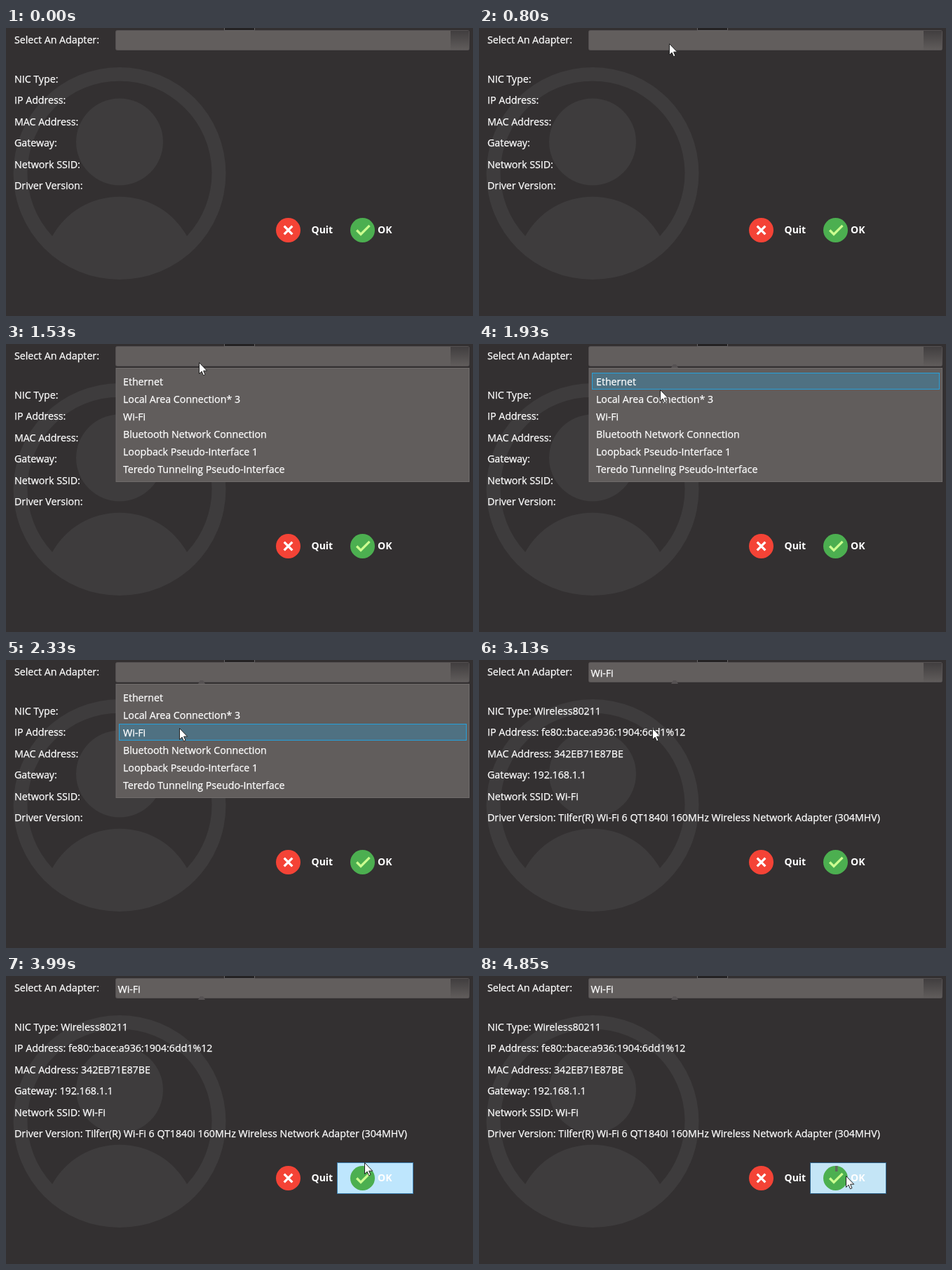
An HTML page that plays this animation: 666x411 px, repeating every 4990 ms.

```html
<!DOCTYPE html>
<html lang="en">
<head>
<meta charset="utf-8">
<title>Select An Adapter</title>
<style>
html, body { margin: 0; width: 100%; height: 100%; overflow: hidden; background: #333031; }
svg { display: block; width: 666px; height: 411px; }
text { font: 14.2px "Open Sans", "Noto Sans", sans-serif; fill: #fff; stroke: #fff; stroke-width: .25px; }
.bold { font-weight: 700; font-size: 14px; stroke: none; }
.soft { fill: #3e3c3d; }

.cursor, .slide, .popup, .row, .value, .hover, .press, .trace, .smudge {
  animation: 4.99s step-end infinite;
}
.cursor { animation-name: cursor; }
.popup { animation-name: popup; }
.slide { animation-name: slide; }
.row { animation-name: row; }
.value { animation-name: value; }
.hover { animation-name: hover; }
.press { animation-name: press; }
.trace { animation-name: trace; }
.smudge { animation-name: smudge; }

@keyframes cursor {
  0% { transform: translate(-40px, -40px); }
  4% { transform: translate(146px, 283px); }
  5.41% { transform: translate(186px, 222px); }
  6.61% { transform: translate(246px, 146px); }
  8.01% { transform: translate(318px, 76px); }
  9.41% { transform: translate(384px, 26px); }
  10.62% { transform: translate(428px, 1px); }
  12.02% { transform: translate(342px, 2px); }
  13.42% { transform: translate(257px, 9px); }
  14.62% { transform: translate(264px, 15px); }
  16.03% { transform: translate(271px, 22px); }
  17.23% { transform: translate(275px, 26px); }
  37.27% { transform: translate(264px, 49px); }
  38.67% { transform: translate(258px, 65px); }
  43.88% { transform: translate(256px, 71px); }
  45.29% { transform: translate(251px, 85px); }
  46.69% { transform: translate(247px, 97px); }
  66.73% { transform: translate(257px, 103px); }
  68.13% { transform: translate(282px, 119px); }
  69.33% { transform: translate(321px, 143px); }
  70.74% { transform: translate(371px, 174px); }
  72.14% { transform: translate(416px, 202px); }
  73.34% { transform: translate(453px, 226px); }
  74.74% { transform: translate(480px, 243px); }
  75.95% { transform: translate(495px, 252px); }
  77.35% { transform: translate(505px, 261px); }
  78.75% { transform: translate(510px, 266px); }
  79.95% { transform: translate(511px, 266px); }
  82.56% { transform: translate(514px, 270px); }
  83.96% { transform: translate(517px, 276px); }
  85.37% { transform: translate(521px, 282px); }
  86.57%, 100% { transform: translate(523px, 285px); }
}
@keyframes popup {
  0% { visibility: hidden; }
  27.85% { visibility: visible; }
  62.72%, 100% { visibility: hidden; }
}
@keyframes slide {
  0% { transform: translateY(-111px); }
  29.25% { transform: translateY(-36px); }
  30.66%, 100% { transform: none; }
}
@keyframes row {
  0% { opacity: 0; transform: none; }
  37.27% { opacity: 1; transform: none; }
  43.88% { opacity: 1; transform: translateY(25px); }
  46.69%, 100% { opacity: 1; transform: translateY(50px); }
}
@keyframes value {
  0% { visibility: hidden; }
  62.72%, 100% { visibility: visible; }
}
@keyframes hover {
  0% { visibility: hidden; }
  78.75%, 100% { visibility: visible; }
}
@keyframes press {
  0% { fill: #bee6fd; stroke: #3c7fb1; }
  97.19%, 100% { fill: #c4e5f6; stroke: #2c628b; }
}
@keyframes trace {
  0% { visibility: hidden; }
  37.27%, 100% { visibility: visible; }
}
@keyframes smudge {
  0% { visibility: hidden; }
  82.56%, 100% { visibility: visible; }
}
</style>
</head>
<body>
<svg viewBox="0 0 666 411">
  <defs>
    <linearGradient id="arrow" x1="0" y1="0" x2="0" y2="1">
      <stop offset="0" stop-color="#413e3f"/>
      <stop offset="1" stop-color="#605c5b"/>
    </linearGradient>
    <clipPath id="below"><rect x="150" y="32" width="516" height="379"/></clipPath>
  </defs>
  <rect width="666" height="411" fill="#333031"/>

  <!-- Backdrop avatar -->
  <path class="soft" fill-rule="evenodd" d="M10.5 207.5a151.5 151.5 0 1 1 303 0a151.5 151.5 0 1 1-303 0zM66 297A131.5 131.5 0 1 1 258 297A110 110 0 0 0 66 297z"/>
  <circle class="soft" cx="162" cy="162.5" r="62"/>

  <!-- Combo box and the tab above it -->
  <rect x="156.5" y="3.5" width="504" height="28" rx="2" fill="#625e5d" stroke="#555152"/>
  <rect x="634" y="4" width="26" height="27" fill="url(#arrow)"/>
  <path d="M311.5-1V3.5H354.5V-1" fill="#242223" stroke="#666364"/>

  <text x="12" y="22">Select An Adapter:</text>
  <text class="value" x="159.5" y="24">Wi-Fi</text>

  <text x="12" y="78">NIC Type: <tspan class="value">Wireless80211</tspan></text>
  <text x="12" y="108">IP Address: <tspan class="value">fe80::bace:a936:1904:6dd1%12</tspan></text>
  <text x="12" y="139">MAC Address: <tspan class="value">342EB71E87BE</tspan></text>
  <text x="12" y="169">Gateway: <tspan class="value">192.168.1.1</tspan></text>
  <text x="12" y="200">Network SSID: <tspan class="value">Wi-Fi</tspan></text>
  <text x="12" y="230">Driver Version: <tspan class="value">Tilfer(R) Wi-Fi 6 QT1840i 160MHz Wireless Network Adapter (304MHV)</tspan></text>

  <!-- Buttons -->
  <g class="hover"><rect class="press" x="472.5" y="266.5" width="108" height="44"/></g>
  <g transform="translate(382.5 268.5) scale(.8333)">
    <circle cx="24" cy="24" r="21" fill="#f44336"/>
    <path d="M17 17L31 31M31 17L17 31" stroke="#fff" stroke-width="4"/>
  </g>
  <g transform="translate(488.5 268.5) scale(.8333)">
    <circle cx="24" cy="24" r="21" fill="#4caf50"/>
    <path d="M14 24L21 31L36 16" fill="none" stroke="#ccff90" stroke-width="4"/>
  </g>
  <rect class="smudge" x="508" y="271" width="3.5" height="8" fill="#5f6b5c"/>
  <text class="bold" x="435.5" y="293">Quit</text>
  <text class="bold" x="530" y="293">OK</text>

  <!-- Drop-down list -->
  <g clip-path="url(#below)">
    <g class="popup">
      <g class="slide">
        <rect x="157" y="34.5" width="503.5" height="162" fill="#615d5c" stroke="#6f6b6a"/>
        <rect class="row" x="161.5" y="41.5" width="495" height="23" fill="#4f7182" stroke="#26a0da"/>
        <text x="167" y="59">Ethernet</text>
        <text x="167" y="84">Local Area Connection* 3</text>
        <text x="167" y="109">Wi-Fi</text>
        <text x="167" y="134">Bluetooth Network Connection</text>
        <text x="167" y="159">Loopback Pseudo-Interface 1</text>
        <text x="167" y="184">Teredo Tunneling Pseudo-Interface</text>
      </g>
    </g>
  </g>
  <path class="trace" d="M274 34l3-5h4l3 5z" fill="#565253"/>

  <path class="cursor" d="M.5.5V16.5L4.1 13.1L6.5 18.8L9 17.7L6.6 12.2H11.7z" fill="#fff" stroke="#222"/>
</svg>
</body>
</html>
```
